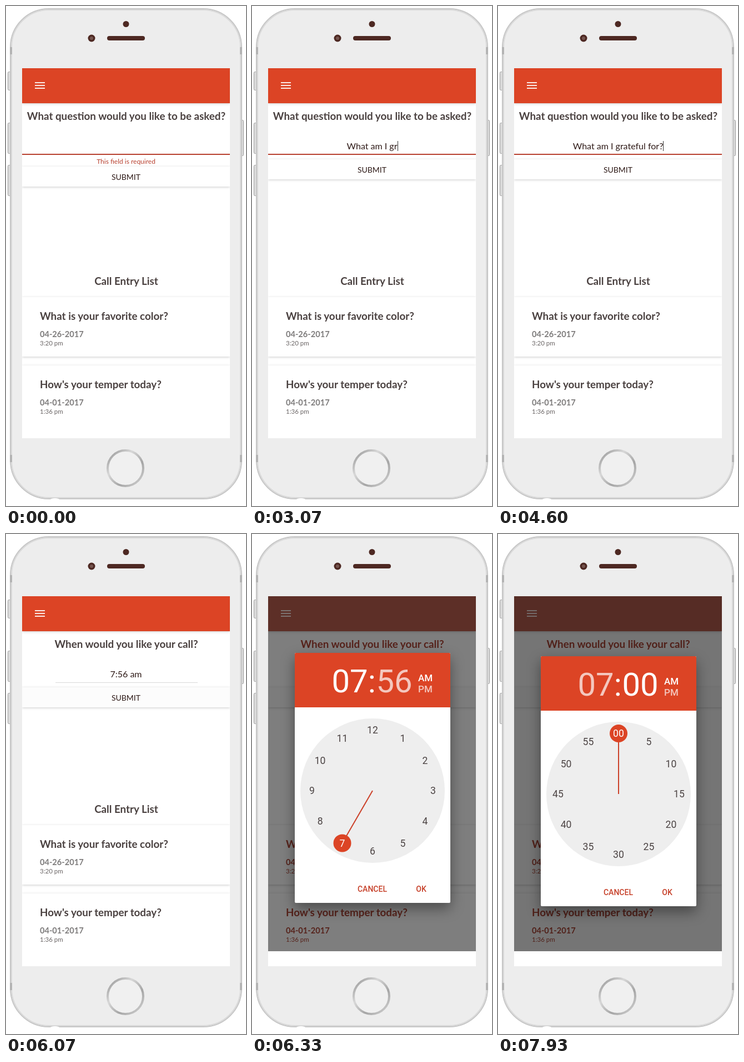
An HTML page for the animation above (8000 ms loop, 432 by 900 pixels).

```html
<!DOCTYPE html>
<html lang="en">
<head>
<meta charset="utf-8">
<title>Call scheduler on a phone</title>
<style>
  html, body { margin: 0; width: 100%; height: 100%; overflow: hidden; background: #fff; }
  svg { display: block; width: 432px; height: 900px; }
  text { font: 16px Lato, sans-serif; fill: #2f1b18; white-space: pre; }
  .mid { text-anchor: middle; }
  .title { font-size: 18.8px; font-weight: 700; fill: #4a4140; }
  .date { font-size: 14.6px; font-weight: 700; fill: #7d7b7b; }
  .time { font-size: 11.5px; fill: #6a6565; }
  .error { font-size: 12px; fill: #b8402f; }
  .label { font-size: 14px; }
  .card { fill: #fff; filter: drop-shadow(0 1.5px 2px rgba(0,0,0,.2)); }
  .red, .card.red { fill: #dc4425; }
  .panel { fill: #fff; filter: drop-shadow(0 10px 12px rgba(0,0,0,.4)); }
  .dim text { fill: #ae4636; }
  .dim .card.red { fill: #bd6050; }
  #dialog text { font-family: Roboto, sans-serif; }
  #dialog .digits { font-size: 58px; fill: #fff; }
  #dialog .half { font-size: 17px; font-weight: 500; fill: #fff; }
  #dialog .action { font-size: 14px; font-weight: 500; fill: #c63f28; }
  #dial text { font-size: 17.6px; fill: #4c4444; }
  #dial .picked { fill: #fff; }
</style>
</head>
<body>
<svg viewBox="0 0 432 900">
  <defs>
    <linearGradient id="metal" x2="1" y2="1">
      <stop stop-color="#8f8f8f"/><stop offset=".35" stop-color="#d8d8d8"/>
      <stop offset=".65" stop-color="#a5a5a5"/><stop offset="1" stop-color="#d5d5d5"/>
    </linearGradient>
    <clipPath id="view"><rect x="29" y="112" width="374" height="639"/></clipPath>
  </defs>

  <g fill="#dedede" stroke="#9a9a9a">
    <rect x="3.5" y="118.5" width="5" height="33" rx="2"/>
    <rect x="3.5" y="210.5" width="5" height="55" rx="2"/>
    <rect x="3.5" y="286.5" width="5" height="55" rx="2"/>
    <rect x="422.5" y="205.5" width="5" height="64" rx="2"/>
  </g>
  <rect x="8" y="5" width="416" height="882" rx="69" fill="#ededed" stroke="#c6c6c6" stroke-width="2"/>
  <rect x="10" y="7" width="412" height="878" rx="67" fill="none" stroke="#d9d9d9" stroke-width="2"/>
  <path d="M9 74v13M423 74v13M9 808v13M423 808v13" stroke="#b4b4b4" stroke-width="4"/>
  <ellipse cx="88" cy="889" rx="9" ry="3" fill="#fff"/>
  <g fill="#4d2822">
    <circle cx="216" cy="32.5" r="5.5"/>
    <circle cx="154" cy="58" r="6.5"/>
    <circle cx="154" cy="58" r="3" fill="#75554f"/>
    <rect x="182" y="54" width="68" height="8" rx="4"/>
  </g>
  <circle cx="215" cy="832" r="32" fill="#f0f0f0" stroke="url(#metal)" stroke-width="4"/>
  <rect x="29" y="113" width="374" height="665" fill="#fff"/>
  <path d="M29 750.5h2M401 750.5h2" stroke="#444"/>

  <g clip-path="url(#view)">
    <g id="form">
      <rect class="card red" x="29" y="112" width="374" height="63"/>
      <path d="M52 138h18M52 143h18M52 148h18" stroke="#fbe9e5" stroke-width="2"/>
      <text id="question" class="title mid" x="216.5" y="205"></text>
      <text id="entry" class="mid" x="216" y="258"></text>
      <rect id="caret" y="243" width="1" height="18" fill="#333"/>
      <text id="error" class="error mid" x="216" y="284">This field is required</text>
      <g id="submit">
        <rect id="button" class="card" x="29" y="276" width="374" height="36"/>
        <text class="label mid" x="216" y="300">SUBMIT</text>
      </g>
      <rect id="underline"/>

      <text class="title mid" x="216.5" y="502">Call Entry List</text>
      <rect class="card" x="29" y="524" width="374" height="107"/>
      <text class="title" x="61" y="565">What is your favorite color?</text>
      <text class="date" x="61" y="596">04-26-2017</text>
      <text class="time" x="61" y="611">3:20 pm</text>
      <rect class="card" x="29" y="647" width="374" height="120"/>
      <text class="title" x="61" y="688">How's your temper today?</text>
      <text class="date" x="61" y="719">04-01-2017</text>
      <text class="time" x="61" y="734">1:36 pm</text>
    </g>

    <rect id="shade" x="29" y="112" width="374" height="639"/>
    <g id="dialog">
      <rect class="panel" x="77" y="220" width="280" height="450" rx="2"/>
      <path class="red" d="M77 318v-96q0-2 2-2h276q2 0 2 2v96z"/>
      <text id="hours" class="digits" x="143.5" y="291">07</text>
      <text class="digits" x="208.8" y="291">:</text>
      <text id="minutes" class="digits" x="223.5" y="291"></text>
      <text class="half mid" x="312" y="271">AM</text>
      <text class="half mid" x="312" y="291" opacity=".7">PM</text>
      <circle cx="217" cy="468" r="130" fill="#eee"/>
      <g id="dial"></g>
      <text class="action mid" x="216.5" y="650">CANCEL</text>
      <text class="action mid" x="304.5" y="650">OK</text>
    </g>
  </g>
</svg>

<script>
const LOOP = 8000, FOCUS = 350, SENT = 5000, OPEN = 6160, MINUTES = 7100, ZERO = 7930;
const ANSWER = 'What am I grateful for?';
const TYPING = [[700, 0], [1270, 5], [3030, 12], [4440, 23]]; // [ms, letters typed]

const $ = id => document.getElementById(id);
const set = (id, attrs) => {
  for (const key in attrs) $(id).setAttribute(key, attrs[key]);
};
const show = (id, on) => { $(id).style.display = on ? '' : 'none'; };
const easeOut = x => 1 - (1 - Math.min(1, Math.max(0, x))) ** 5;

function lettersAt(t) {
  for (let i = 1; i < TYPING.length; i++) {
    const [t0, n0] = TYPING[i - 1], [t1, n1] = TYPING[i];
    if (t < t1) return Math.max(0, Math.floor(n0 + (n1 - n0) * (t - t0) / (t1 - t0)));
  }
  return ANSWER.length;
}

// turn is the fraction of a full circle, clockwise from the top
function polar(turn, radius) {
  const a = turn * 2 * Math.PI;
  return [217 + radius * Math.sin(a), 468 - radius * Math.cos(a)];
}

function dialMarkup(value, steps, label) {
  const turn = value / steps, onNumber = value % (steps / 12) === 0;
  const [hx, hy] = polar(turn, 104);
  let out = `<path d="M217 468L${hx} ${hy}" stroke="#cc4129" stroke-width="2"/>`;
  if (!onNumber) {
    const [x, y] = polar(turn, 101.5);
    out += `<circle cx="${x}" cy="${y}" r="5.5" fill="#fff" stroke="#dc4425" stroke-width="4"/>`;
  }
  for (let i = 0; i < 12; i++) {
    const [x, y] = polar(i / 12, 109);
    const picked = onNumber && i === Math.round(turn * 12);
    if (picked) out += `<circle class="red" cx="${x}" cy="${y}" r="16"/>`;
    out += `<text class="mid ${picked ? 'picked' : ''}" x="${x}" y="${y + 6.3}">${label(i)}</text>`;
  }
  return out;
}

const DIALS = {
  hour: dialMarkup(7, 12, i => i || 12),
  old: dialMarkup(56, 60, i => i * 5 || '00'),
  zero: dialMarkup(0, 60, i => i * 5 || '00'),
};
let currentDial;

function drawForm(t) {
  const asking = t < SENT, count = lettersAt(t);
  const failed = count === 0;
  $('question').textContent = asking
    ? 'What question would you like to be asked?' : 'When would you like your call?';
  $('entry').textContent = asking ? ANSWER.slice(0, count) : '7:56 am';
  set('underline', asking
    ? { x: 29, y: 266, width: 374, height: 2, fill: '#b8402f' }
    : { x: 89, y: 267, width: 256, height: 1, fill: '#d9d9d9' });
  show('error', failed);
  set('submit', { transform: `translate(0 ${failed ? 13 : 0})` });
  $('button').style.fill = asking ? '#fff' : '#fcfcfc';
  show('caret', asking && t > FOCUS && t < SENT - 30);
  set('caret', { x: Math.round(216 + $('entry').getComputedTextLength() / 2) });
}

function drawDialog(t) {
  const open = t >= OPEN, slide = easeOut((t - OPEN) / 450);
  show('shade', open);
  show('dialog', open);
  $('form').classList.toggle('dim', open);
  if (!open) return;
  set('shade', { opacity: 0.54 * easeOut((t - OPEN) / 400) });
  set('dialog', { transform: `translate(0 ${Math.round(-64 * (1 - slide))})` });
  const onHours = t < MINUTES;
  set('hours', { opacity: onHours ? 1 : 0.7 });
  set('minutes', { opacity: onHours ? 0.7 : 1 });
  $('minutes').textContent = t < ZERO ? '56' : '00';
  const dial = onHours ? 'hour' : t < ZERO ? 'old' : 'zero';
  if (dial !== currentDial) $('dial').innerHTML = DIALS[currentDial = dial];
}

function frame() {
  const t = performance.now() % LOOP;
  drawForm(t);
  drawDialog(t);
  requestAnimationFrame(frame);
}
frame();
</script>
</body>
</html>
```
